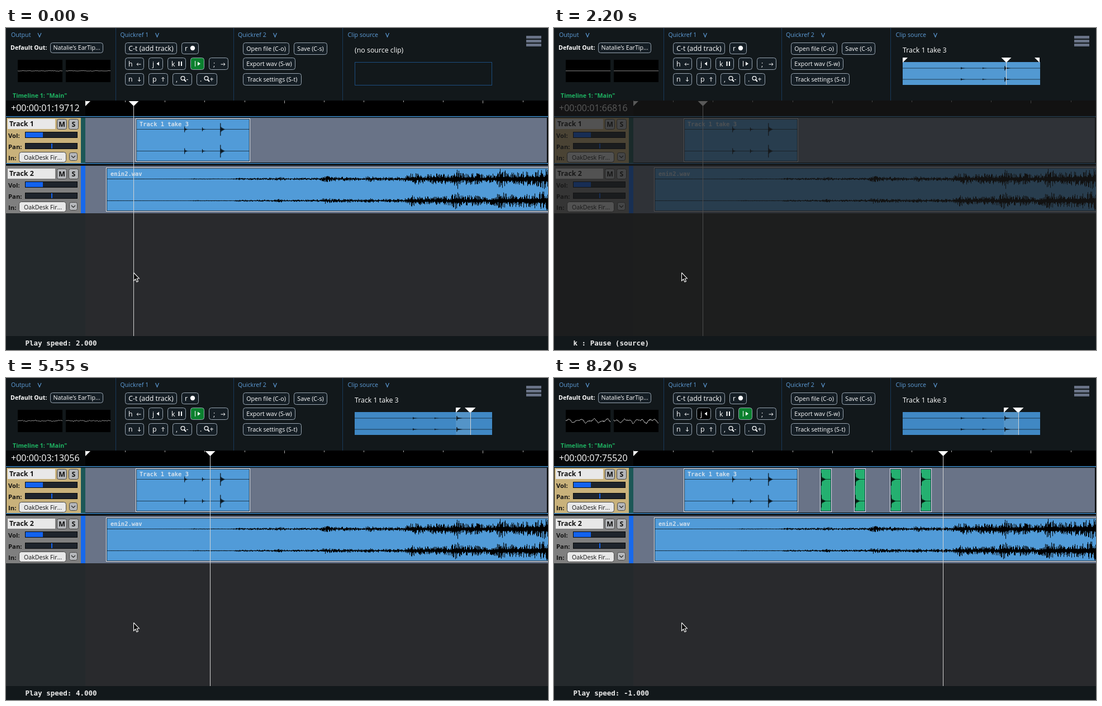
An HTML page with a canvas for the animation above (8.25 s loop, 970x577 px).

```html
<!DOCTYPE html>
<html lang="en">
<head>
<meta charset="utf-8">
<title>Audio timeline</title>
<style>
html, body { margin: 0; width: 100%; height: 100%; overflow: hidden; background: #12181b; }
canvas { display: block; }
</style>
</head>
<body>
<canvas id="stage" width="970" height="577"></canvas>
<script>
const ctx = document.getElementById('stage').getContext('2d');
const LOOP = 8.25;
const SANS = '"Open Sans", "Noto Sans", sans-serif';
const MONO = '"DejaVu Sans Mono", "Liberation Mono", monospace';
const SMALL = 10.65, MEDIUM = 12.4, LARGE = 16;
const PANEL = '#12181b', BLUE = '#519bd8', SLATE = '#697387', LABEL = '#5f9fdc';
const ORIGIN = 142.4, SCALE = 71.15;

// [start time, message]
const MESSAGES = [
  [0, 'Play speed: 2.000'],
  [0.27, 'k : Pause'],
  [0.7, 'C-1 : Load clip at cursor to source'],
  [0.88, 'S-1 : Activate Source Mode'],
  [0.94, 'Play speed: 2.000'],
  [2.0, 'k : Pause (source)'],
  [2.4, 'Play speed: -1.000'],
  [2.45, 'k : Pause (source)'],
  [2.6, 'i : Set In mark (source)'],
  [3.25, 'l : Play (source)'],
  [3.6, 'k : Pause (source)'],
  [4.25, 'o : Set Out mark (source)'],
  [4.7, 'S-1 : Activate Source Mode'],
  [5.0, 'Play speed: 2.000'],
  [5.4, 'Play speed: 4.000'],
  [6.0, 'Play speed: -1.000'],
  [6.2, 'k : Pause'],
  [6.35, 'b : Drop clip from source'],
  [6.63, 'Play speed: 2.000'],
  [7.065, 'b : Drop clip from source'],
  [8.17, 'Play speed: -1.000']
];
// [time, x] pairs, linear in between
const HEAD = [[0, 228.1], [0.267, 266], [5, 266], [5.4, 322.9], [6, 493.3], [6.23, 476.9],
  [6.635, 476.9], [8.18, 697.8], [8.25, 692.8]];
const SOURCE_HEAD = [[0, 624.5], [0.93, 624.5], [2.0, 809], [2.4, 809], [2.45, 805], [3.3, 805], [3.6, 831]];
const DROPS = [[6.35, 477], [7.065, 538], [7.515, 602], [7.895, 656]];
const ENVELOPE = [[181, 0.2], [325, 0.2], [335, 0.8], [405, 0.6], [415, 1.7], [470, 1.8], [491, 3], [505, 1.8],
  [560, 2.2], [571, 5.5], [585, 3.5], [610, 3.5], [640, 2.6], [650, 5], [662, 3], [712, 3.5], [727, 11], [745, 7],
  [775, 9], [795, 8], [805, 18], [816, 9], [835, 10], [860, 7], [876, 9], [885, 18], [897, 11], [925, 12], [950, 14], [970, 18]];

function lerpAt(points, v) {
  if (v <= points[0][0]) return points[0][1];
  for (let i = 1; i < points.length; i++) {
    const [a, p] = points[i - 1], [b, q] = points[i];
    if (v < b) return p + (q - p) * (v - a) / (b - a);
  }
  return points[points.length - 1][1];
}

function seeded(seed) {
  return () => {
    seed = (seed * 1664525 + 1013904223) >>> 0;
    return seed / 4294967296;
  };
}

function makeWave(seed, gain) {
  const rnd = seeded(seed), cols = [];
  for (let x = 181; x < 970; x++) {
    const e = lerpAt(ENVELOPE, x) * gain;
    const spike = () => Math.min(18, e * (0.22 + 0.95 * rnd() ** 1.6));
    cols.push([x, spike(), spike()]);
  }
  return cols;
}
const waves = [makeWave(7, 1), makeWave(91, 0.9)];

function box(x, y, w, h, fill) {
  ctx.fillStyle = fill;
  ctx.fillRect(x, y, w, h);
}

function rounded(x, y, r, b, radius, fill, stroke) {
  ctx.beginPath();
  ctx.roundRect(x + 0.5, y + 0.5, r - x - 1, b - y - 1, radius);
  ctx.fillStyle = fill;
  ctx.fill();
  ctx.strokeStyle = stroke;
  ctx.lineWidth = 1;
  ctx.stroke();
}

function text(s, x, mid, size, color = '#fff', weight = 400, family = SANS, align = 'left') {
  ctx.font = `${weight} ${size}px ${family}`;
  ctx.fillStyle = color;
  ctx.textAlign = align;
  ctx.fillText(s, x, mid + size * 0.36);
}

function poly(points, fill) {
  ctx.beginPath();
  points.forEach(([x, y]) => ctx.lineTo(x, y));
  ctx.closePath();
  ctx.fillStyle = fill;
  ctx.fill();
}

function path(points, color, width = 1) {
  ctx.beginPath();
  points.forEach(([x, y]) => ctx.lineTo(x, y));
  ctx.strokeStyle = color;
  ctx.lineWidth = width;
  ctx.stroke();
}

function button(x, y, r, b, label, size = SMALL, fill = '#151e25') {
  rounded(x, y, r, b, 4, fill, '#98a5b1');
  if (label) text(label, (x + r) / 2, (y + b) / 2, size, '#fff', 400, SANS, 'center');
}

function arrow(x, y, dx, dy) {
  const tip = [x + dx * 3.5, y + dy * 3.5];
  path([[x - dx * 4, y - dy * 4], tip], '#fff');
  path([[x + dx + dy * 2.5, y + dy + dx * 2.5], tip, [x + dx - dy * 2.5, y + dy - dx * 2.5]], '#fff');
}

function lens(x, y, sign) {
  ctx.beginPath();
  ctx.arc(x, y - 2, 3.4, 0, 7);
  ctx.strokeStyle = '#fff';
  ctx.lineWidth = 1.3;
  ctx.stroke();
  path([[x + 2.4, y + 0.5], [x + 5.5, y + 4]], '#fff', 2);
  text(sign, x + 6, y, MEDIUM);
}

function section(name, x, arrowX) {
  text(name, x, 12.5, SMALL, LABEL);
  path([[arrowX - 3, 9], [arrowX, 16], [arrowX + 3, 9]], LABEL, 1.1);
}

function scope(x, t, amp, seed) {
  box(x, 57, 80, 40, '#000');
  const pts = [];
  const rough = t > 7.8 ? 0.25 : 0.75;
  const rnd = seeded(Math.floor(t * 20) * 13 + seed);
  for (let i = 0; i <= 80; i++) {
    const slow = Math.sin(i * 0.27 + t * 31 + seed) * 0.6 + Math.sin(i * 0.55 + t * 17) * 0.4;
    pts.push([x + i, 76.8 + amp * (slow * (1 - rough * 0.5) + (rnd() - 0.5) * 2 * rough)]);
  }
  path(pts, amp > 1.5 ? '#b9b9b9' : '#8a8a8a', 1);
}

function drawTop(t, headX, playing, sourcePlaying) {
  box(0, 0, 970, 130, PANEL);
  [196, 407, 602].forEach(x => box(x, 0, 1, 130, '#18395a'));
  section('Output', 9, 60);
  section('Quickref 1', 204.5, 270.5);
  section('Quickref 2', 415, 481.5);
  section('Clip source', 611.5, 682.5);
  text('Default Out:', 8, 35.5, SMALL, '#fff', 700);
  button(79, 26, 174, 45, 'Natalie’s EarTip...');
  const amp = playing ? 0.3 + lerpAt(ENVELOPE, headX) * 1.35 : sourcePlaying ? 0.5 : t < 0.95 ? 0.3 : 0;
  scope(21, t, amp, 1);
  scope(107, t, amp, 2);
  text('Timeline 1: "Main"', 12, 121.5, SMALL, '#1fb463', 700);

  const active = playing || sourcePlaying;
  const held = times => times.some(a => t >= a && t < a + 0.15);
  const jFill = t >= 6 && t < 6.35 || t >= 8.17 || held([2.4]) ? '#000' : undefined;
  const kFill = held([0.27, 2.0, 2.45, 3.6, 6.2]) ? '#000' : undefined;
  button(213, 26, 306, 47, 'C-t (add track)', MEDIUM);
  button(314, 26, 345, 47);
  text('r', 320, 36.5, MEDIUM);
  ctx.beginPath();
  ctx.arc(334, 36, 4.2, 0, 7);
  ctx.fillStyle = '#fff';
  ctx.fill();
  button(213, 53, 247, 75);
  text('h', 219, 64.5, MEDIUM);
  arrow(237.5, 65, -1, 0);
  button(255, 53, 281, 75, '', 0, jFill);
  text('j', 262, 64.5, MEDIUM);
  poly([[274, 60.5], [274, 67.5], [269.5, 64]], '#fff');
  button(289, 53, 322, 75, '', 0, kFill);
  text('k', 296, 64.5, MEDIUM);
  box(308.5, 60, 2, 8, '#fff');
  box(313, 60, 2, 8, '#fff');
  button(330, 53, 355, 75, '', 0, active ? '#0b812f' : undefined);
  text('l', 337, 64.5, MEDIUM);
  poly([[343, 60.5], [343, 67.5], [348, 64]], '#fff');
  button(363, 53, 398, 75);
  text(';', 371, 64.5, MEDIUM);
  arrow(388.5, 65, 1, 0);
  button(213, 81, 247, 103);
  text('n', 219, 92, MEDIUM);
  arrow(238.5, 92, 0, 1);
  button(255, 81, 290, 103);
  text('p', 262, 92, MEDIUM);
  arrow(281, 92, 0, -1);
  button(298, 81, 333, 103);
  text(',', 304, 92, MEDIUM);
  lens(316.5, 92, '-');
  button(341, 81, 378, 103);
  text('.', 347, 92, MEDIUM);
  lens(358.5, 92, '+');
  button(424, 26, 507, 48, 'Open file (C-o)');
  button(515, 26, 575, 48, 'Save (C-s)');
  button(424, 53, 518, 75, 'Export wav (S-w)');
  button(424, 81, 529, 103, 'Track settings (S-t)');
  [14, 21, 28].forEach(y => box(931, y, 27, 5, SLATE));
}

// Decaying hit with a sharp attack
function burst(x, y, amp, len) {
  ctx.fillStyle = '#000';
  for (let i = 0; i < len; i += 0.5) {
    const k = i / len, jag = 0.75 + 0.25 * Math.sin(i * 9);
    const h = amp * (i < 1 ? 1 : 0.55 * (1 - k) ** 1.4 * jag);
    ctx.fillRect(x + i, y - h, 0.6, h * 2.05);
  }
}

function wholeTake(x, w, y, amp) {
  const k = w / 203;
  box(x, y - 0.5, w, 1, 'rgba(0,0,0,.6)');
  burst(x + 86 * k, y, 5 * amp, 7 * k);
  burst(x + 118 * k, y, 3.3 * amp, 7 * k);
  burst(x + 150.5 * k, y, 11 * amp, 9 * k);
}

function flag(x, y, dir) {
  poly([[x, y], [x + 9 * dir, y], [x, y + 9]], '#fff');
}

function playhead(x, y, bottom) {
  const col = Math.floor(x), mid = col + 0.5;
  box(col, y, 1, bottom - y, '#d4d4d4');
  poly([[mid - 9, y], [mid + 9, y], [mid, y + 9]], '#fff');
}

function drawSource(t, sourceMode) {
  if (t < 0.7) {
    text('(no source clip)', 624, 39.5, MEDIUM);
    ctx.strokeStyle = '#1c4d80';
    ctx.lineWidth = 1;
    ctx.strokeRect(624.5, 61.5, 245, 41);
    return;
  }
  text('Track 1 take 3', 624, 39.5, MEDIUM);
  const from = t < 2.6 ? 624 : 805, to = t < 4.25 ? 870 : 831;
  box(624, 61, 246, 41, '#4088c4');
  box(from, 61, to - from, 41, sourceMode ? '#5299d2' : '#5494c8');
  wholeTake(624, 246, 72, 0.36);
  wholeTake(624, 246, 92, 0.36);
  flag(from, 53, 1);
  flag(to - 1, 53, -1);
  playhead(lerpAt(SOURCE_HEAD, t), 53, 102);
}

function header(y, name, tint, strip) {
  box(1, y, 133, 81, tint);
  box(134, y, 8, 81, strip);
  box(3, y + 2, 85, 18, '#e8e8e8');
  text(name, 6, y + 11, MEDIUM, '#111', 700);
  rounded(91, y + 2, 109, y + 21, 3, '#b5b7ba', '#444');
  rounded(112, y + 2, 130, y + 21, 3, '#b5b7ba', '#444');
  text('M', 100, y + 12, MEDIUM, '#111', 700, SANS, 'center');
  text('S', 121, y + 12, MEDIUM, '#111', 700, SANS, 'center');
  text('Vol:', 4, y + 31.5, 11.3, '#111', 700);
  text('Pan:', 4, y + 52, 11.3, '#111', 700);
  text('In:', 4, y + 71.5, 11.3, '#111', 700);
  [25, 45].forEach(d => {
    box(34, y + d, 94, 11, '#07090b');
    box(35, y + d + 1, 92, 9, '#1e242c');
  });
  box(35, y + 26, 31, 9, '#1262ee');
  box(81, y + 46, 2, 9, '#1262ee');
  rounded(23, y + 61, 108, y + 80, 4, '#e8e8e8', '#444');
  text('OakDesk Fir...', 66, y + 71.5, SMALL, '#111', 400, SANS, 'center');
  rounded(113, y + 62, 128, y + 77, 3, '#b5b7ba', '#444');
  path([[117, y + 68], [120.5, y + 71.5], [124, y + 68]], '#222', 1.2);
}

function clip(x, y, r, b, fill) {
  box(x, y, r - x, b - y, '#e4e8ee');
  box(x + 1, y + 1, r - x - 2, b - y - 2, '#1d3448');
  box(x + 2, y + 2, r - x - 4, b - y - 4, fill);
}

function drawTimeline(t, headX) {
  box(0, 130, 970, 422, '#292a2d');
  box(0, 130, 142, 422, '#24292c');
  box(0, 130, 970, 28, '#000');
  box(0, 130, 142, 28, '#07090a');
  for (let s = 0; s < 12; s++) {
    box(Math.floor(ORIGIN + s * SCALE), 130, 1, s % 5 ? 3 : 5, '#a8a8a8');
  }
  const secs = t > 0.23 && t < 5 ? 1.696 : (headX - ORIGIN) / SCALE;
  const whole = Math.floor(secs);
  const frac = Math.min(95744, Math.round((secs - whole) * 375) * 256);
  text(`+00:00:0${whole}:${String(frac).padStart(5, '0')}`, 9, 143, LARGE);
  flag(142, 131, 1);

  box(0, 157, 970, 89, '#050708');
  box(0, 158, 970, 1.5, '#3f8dcc');
  box(0, 242, 970, 1.5, '#3f8dcc');
  box(142, 161, 826, 80, SLATE);
  box(142, 247, 828, 85, SLATE);
  header(161, 'Track 1', '#c9b27b', '#1c5757');
  box(0, 247, 134, 85, '#7f7f7f');
  box(134, 247, 8, 85, '#1769ec');
  header(250, 'Track 2', '#7f7f7f', '#1769ec');

  clip(232, 162, 437, 240, BLUE);
  wholeTake(233.5, 202, 181.5, 1);
  wholeTake(233.5, 202, 220.5, 1);
  text('Track 1 take 3', 239, 172.5, 10.45, '#d3e0ec', 700, MONO);
  DROPS.forEach(([at, x]) => {
    if (t < at) return;
    clip(x - 1, 162, x + 20, 240, '#24b070');
    [181.5, 220.5].forEach(y => {
      box(x + 1, y - 0.5, 17, 1, 'rgba(0,0,0,.65)');
      burst(x + 1, y, 11, 9);
    });
  });

  clip(179, 250, 980, 329, BLUE);
  waves.forEach((cols, i) => {
    const y = i ? 309.5 : 270.5;
    box(181, y - 0.5, 789, 1, 'rgba(0,0,0,.6)');
    ctx.fillStyle = '#000';
    cols.forEach(([x, up, down]) => ctx.fillRect(x, y - up, 1, up + down));
  });
  text('enin2.wav', 187, 261.5, 10.45, '#d3e0ec', 700, MONO);
  playhead(headX, 131, 552);
}

function drawCursor() {
  const pts = [[228.5, 438.5], [228.5, 453], [231.7, 450], [234, 455], [236.4, 454], [234.2, 449], [238.3, 448.7]];
  poly(pts, '#000');
  path([...pts, pts[0]], '#fff', 1.1);
}

function draw(t) {
  const headX = lerpAt(HEAD, t);
  const playing = t < 0.267 || t >= 5 && t < 6.2 || t >= 6.635;
  const sourcePlaying = t >= 0.93 && t < 2 || t >= 2.4 && t < 2.45 || t >= 3.3 && t < 3.6;
  const sourceMode = t >= 0.88 && t < 4.7;
  drawTimeline(t, headX);
  if (sourceMode) box(0, 130, 970, 422, 'rgba(25,25,25,.72)');
  drawTop(t, headX, playing, sourcePlaying);
  drawSource(t, sourceMode);
  box(0, 552, 970, 25, PANEL);
  const message = MESSAGES.filter(m => m[0] <= t).pop()[1];
  text(message, 34.5, 564, 12.53, '#ececec', 700, MONO);
  drawCursor();
}

const begin = performance.now();
function tick() {
  const t = ((performance.now() - begin) / 1000) % LOOP;
  draw(Math.floor(t * 20 + 0.001) / 20);
  requestAnimationFrame(tick);
}
tick();
</script>
</body>
</html>
```
